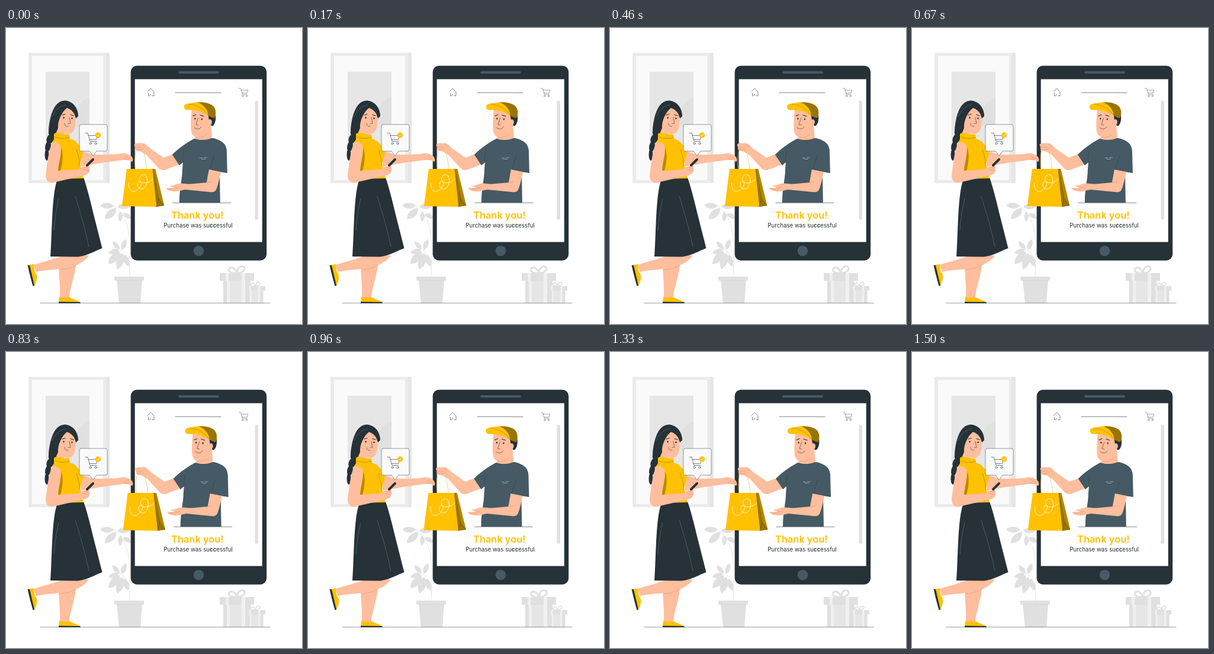
These frames come from a looping animation (500 by 500 pixels, 1540 ms). An HTML page:

```html
<!DOCTYPE html>
<html lang="en">
<head>
<meta charset="utf-8">
<title>Thank you</title>
<style>
  html, body { margin: 0; width: 100%; height: 100%; overflow: hidden; background: #fff; }
  svg { display: block; width: 100vw; height: 100vh; }
  .dark { fill: #263238; }
  .slate { fill: #455a64; }
  .gold { fill: #ffc100; }
  .shade { fill: #997400; }
  .skin { fill: #ffbe9d; }
  .g2 { fill: #e6e6e6; }
  .g3 { fill: #e0e0e0; }
  .line { fill: none; stroke: #263238; stroke-width: .6; stroke-linecap: round; stroke-linejoin: round; }
  .brow { stroke-width: 1.2; }
  .crease { fill: none; stroke: #e88f68; stroke-width: .6; stroke-linecap: round; }
  .seam { fill: none; stroke: #607580; stroke-width: .6; }
  text { font-family: Inter, sans-serif; text-anchor: middle; }
</style>
</head>
<body>
<svg viewBox="0 0 500 500">
  <defs>
    <path id="leaf" d="M0 0C4-7 12-8 19-3C14 3 6 4 0 0Z"/>
    <g id="cart" class="line">
      <path d="M0 0H4L8 14H19M5 4H21L18.500 11H7"/>
      <circle cx="8.500" cy="17.500" r="1.700"/><circle cx="17.500" cy="17.500" r="1.700"/>
    </g>
    <g id="gift">
      <path class="g3" d="M6 13H52V51H6Z"/>
      <path class="g2" d="M17 13H37V51H17Z"/>
      <path class="g3" d="M0 0H58V13H0Z"/>
      <path fill="#f0f0f0" d="M10 0H15V13H17V51H12V13H10ZM37 0H43V51H37Z"/>
      <path d="M29 0C15 1 12-7 18-9C24-11 28-4 29 0C30-8 34-13 40-11C46-7 39 0 29 0Z" fill="none" stroke="#e0e0e0" stroke-width="3"/>
    </g>
    <clipPath id="art"><path d="M67 74H141V220H67Z"/></clipPath>
  </defs>

  <!-- wall picture -->
  <path class="g2" d="M38 42H175V262H38Z"/>
  <path fill="#ebebeb" d="M38 42H169V262H38Z"/>
  <path fill="#fafafa" d="M44 47H164V257H44Z"/>
  <g clip-path="url(#art)">
    <path fill="#e6e6e6" d="M67 74H141V220H67Z"/>
    <circle class="g3" cx="151" cy="150" r="34"/>
  </g>

  <!-- plant -->
  <g class="g3">
    <path d="M209 420C207 395 212 370 207 345C204 325 195 308 180 299M209 410C207 390 203 378 190 373" fill="none" stroke="#e0e0e0" stroke-width=".8"/>
    <use href="#leaf" transform="translate(182 300) rotate(190) scale(1.200)"/>
    <use href="#leaf" transform="translate(186 304) rotate(145) scale(1.400)"/>
    <use href="#leaf" transform="translate(188 302) rotate(8) scale(1.100)"/>
    <use href="#leaf" transform="translate(193 310) rotate(100) scale(.9)"/>
    <use href="#leaf" transform="translate(197 314) rotate(35) scale(.9)"/>
    <use href="#leaf" transform="translate(192 373) rotate(235) scale(.9)"/>
    <use href="#leaf" transform="translate(196 375) rotate(-60)"/>
    <use href="#leaf" transform="translate(191 374) rotate(170)"/>
    <use href="#leaf" transform="translate(192 377) rotate(140) scale(1.500)"/>
    <use href="#leaf" transform="translate(196 380) rotate(115) scale(1.500)"/>
    <use href="#leaf" transform="translate(199 383) rotate(78) scale(1.100)"/>
  </g>
  <path class="g3" d="M187 426H230L227 465H191ZM183 420H233V426.500H183Z"/>
  <path d="M187 427H230" stroke="#d0d0d0" stroke-width=".8"/>

  <use href="#gift" x="361" y="414"/>
  <use href="#gift" transform="translate(405 436) scale(.57)"/>
  <path class="line" opacity=".8" d="M58 464.700H446"/>

  <!-- tablet -->
  <rect class="dark" x="210.700" y="63.700" width="229.500" height="329" rx="10.500"/>
  <path fill="#fff" d="M217.700 86.500H432.800V361.500H217.700Z"/>
  <rect class="slate" x="291" y="73" width="69" height="4" rx="2"/>
  <circle class="slate" cx="325.500" cy="376.500" r="8.800"/>
  <rect class="g3" x="420.500" y="123" width="5.500" height="201" rx="2.700"/>
  <path class="line" d="M286 109.200H340L363 109.500M239 107.500L244.500 102L250 108V114.500H247M240.500 110V114.500H242.500M244 112V114"/>
  <use href="#cart" transform="translate(393.500 102) scale(.73)"/>
  <text class="gold" x="323.300" y="322" font-size="16.400" font-weight="600">Thank you!</text>
  <text class="dark" x="324.600" y="337" font-size="9.700">Purchase was su<tspan font-weight="600">cc</tspan>essful</text>

  <!-- woman -->
  <path class="skin" d="M96 385C82 390 66 394 47 400L50 412C68 408 100 408 118 401C129 396 136 390 140 384Z"/>
  <path class="skin" d="M88 390L118 400C116 420 108 440 106.500 456H91C92 437 89 412 88 390Z"/>
  <path class="crease" d="M91 408C101 408 110 405 118 401"/>
  <path class="gold" d="M37.500 400.500L47 399C48 406 47 411 51 415C54 421 51 429 48 436Z"/>
  <path class="dark" d="M36.500 400.500L40 401L48 435L45.500 436C42 424 39 412 36.500 400.500Z"/>
  <path class="gold" d="M90 454C98 457 104 454 108 455C114 459 123 460 126 464H89Z"/>
  <path class="dark" d="M89 462.500L125 463L126 465H89Z"/>

  <path class="dark" d="M87 255L131 253C136 266 142 290 148 315L162.500 372C151 376 140 384 122 386.500L75 386C78 345 77 280 87 255Z"/>
  <path class="seam" d="M89 288C85 306 82 323 81 342M117 284C125 310 134 340 140 370"/>

  <g class="dark">
    <path d="M72 172C74 150 80 123 100 122.500C114 124 122 136 122 149L114 152L96 180L80 190Z"/>
    <ellipse cx="79" cy="175" rx="7" ry="9" transform="rotate(20 79 175)"/>
    <ellipse cx="75" cy="187" rx="6" ry="9" transform="rotate(25 75 187)"/>
    <ellipse cx="71" cy="200" rx="4.800" ry="9" transform="rotate(10 71 200)"/>
    <ellipse cx="69" cy="214" rx="3.500" ry="10"/>
  </g>
  <path class="skin" d="M127 206C136 213 150 214 164 214L190 213C198 210 207 212 212 217C215 220 215 225 213 226L207 223L197 223L160 228L126 234Z"/>
  <path class="crease" d="M202 217L211 221M199 220L207 223"/>
  <path class="gold" d="M81 179L107 180L108 187C119 189 126 200 130 212L125 230L131 254L87 255L88 240L77 195L81 188Z"/>
  <path class="skin" d="M79 193C72 203 70 228 67 249C67 258 72 262 80 261L132 249C141 247 143 240 140 232L128 235L122 239L88 241C89 225 96 206 91 197C88 193 84 192 79 193Z"/>
  <path class="shade" opacity=".7" d="M93 201C98 214 95 230 92 241H88C89 227 94 214 93 201Z"/>
  <path class="crease" d="M132 235L138 237M130 239L139 241"/>
  <path d="M137 232L147 222" stroke="#263238" stroke-width="4" stroke-linecap="round"/>
  <path class="line" opacity=".5" d="M119 205C122 216 125 223 124 232"/>

  <path class="skin" d="M103 135C112 138 117 145 117.500 153C118 164 116 173 111 177C107 180 101 179 98 177L97 181H83L88 169C87 157 94 142 103 135Z"/>
  <path class="gold" d="M81 179C85 175 91 178 97 179L107 180L108 187H81Z"/>
  <path class="line" opacity=".5" d="M83 184C90 187 99 187 107 185"/>
  <path class="dark" d="M103 135C112 136 117 143 118 153L122 149C121 136 114 126 103 128Z"/>
  <path class="line" d="M107 151L109 161L105 161.500M99 161C99 165 102 167 105 166"/>
  <path class="line brow" d="M95 147L100 145.500M109 146.500L114 148"/>
  <g class="dark"><ellipse cx="97.500" cy="151.500" rx="1.200" ry="1.600"/><ellipse cx="111.500" cy="152.500" rx="1.200" ry="1.600"/></g>
  <path class="seam" d="M78 150C83 138 90 132 101 130"/>

  <!-- speech bubble -->
  <path fill="#fafafa" stroke="#455a64" stroke-width=".6" d="M127 163H168Q171 163 171 166V205Q171 208 168 208H153L147 216L141 208H127Q124 208 124 205V166Q124 163 127 163Z"/>
  <use href="#cart" x="134" y="177.500"/>
  <circle class="gold" cx="155.500" cy="181" r="4.700"/>
  <path d="M153.300 181L155 182.800L158 179.500" fill="none" stroke="#fff"/>

  <!-- courier and bag -->
  <g id="courier">
    <path class="line" d="M282 295.300H380"/>
    <path class="skin" d="M285 212L266 219L243 203C239 199 236 195 231 194.500C226 195 220 193 217 196.500C216 199 219 200 218 202C218 206 221 208 225 208C230 209 232 212 237 214L257 236C261 241 267 241 273 238L294 230Z"/>
    <path class="crease" d="M218 201C222 202 226 202 230 201M219 205C224 206 228 206 232 204M231 197L236 201"/>

    <path class="slate" d="M318 187L350 186C366 190 372 196 373 207L374 245L361 243L362 295H293C293 270 298 255 298 240L299 227L293 232L281 214C292 203 303 195 318 187Z"/>
    <path class="line" opacity=".6" d="M299 227C298 219 299 213 301 208M345 239C347 229 350 222 352 216"/>
    <path d="M327 219.500H332M334 219H340M330 221.500H337" stroke="#a9b5bb" stroke-width=".8"/>
    <path class="skin" d="M343 239L363 243C361 254 358 266 356 271C354 277 350 278 344 277L303 273C296 274 290 277 283 276L277 275L272 273L271 270H284L275 266C285 267 286 263 294 262.500C301 262 306 264 312 263.500L339 261Z"/>
    <path class="crease" d="M284 270L292 270M275 272.500L286 273M339 261L347 260"/>

    <path class="skin" d="M314 136L346 144L352 153C353 160 350 163 346 164L348 185C342 190 326 190 319 187L320 184C315 182 312.500 176 312.500 169C312 159 313 148 314 136Z"/>
    <path class="crease" d="M322 184.500C328 186 335 184 340 179"/>
    <path class="dark" d="M341 144L354 146C355 154 354 161 350 165C348 166 346 165 346 162C342 157 343 150 341 144Z"/>
    <path class="skin" d="M341 158C342 153 348 153 348 159C348 163 344 166 341 164Z"/>
    <path class="gold" d="M301 134C300 129 306 127 314 127C324 124 341 125 349 131C355 137 355 146 352 152C344 150 336 144 328 141C319 138 311 139 305 138.500C302 137 301 136 301 134Z"/>
    <path class="shade" d="M324 125.500C338 125 352 128 354 139C355 144 354 150 352 152L342 148C341 138 335 130 324 125.500Z"/>
    <path class="line" opacity=".45" d="M309 129C322 129 334 136 342 148"/>
    <path class="line" d="M325 152L321 163L325 164M318 168C322 172 328 171 330 167"/>
    <path class="line brow" d="M316 148.500L321 146.500M328 147L334 149"/>
    <g class="dark"><ellipse cx="319.500" cy="153" rx="1.200" ry="1.600"/><ellipse cx="331" cy="154" rx="1.200" ry="1.600"/></g>

    <path fill="none" stroke="#f0c860" stroke-width=".8" d="M219 239C217 226 218 214 220 207M238 239C237 228 235 216 232 208"/>
    <path fill="#b38700" d="M246 238H252.500L267.500 300L254 302Z"/>
    <path class="shade" d="M247.500 238L258 288L267.500 300L254 302Z"/>
    <path class="gold" d="M204 238H247.500L254.500 302L196 301Z"/>
    <path class="line" opacity=".6" d="M249 238L258 288L254.500 302M258 288L267 300"/>
    <path d="M208 261C206 271 212 279 220 275C229 270 231 259 226 259C220 259 221 272 229 272C238 272 241 256 237 250C232 244 224 251 226 257C229 265 243 262 249 254" fill="none" stroke="#fff" stroke-width=".8"/>
  </g>
</svg>
<script>
  const courier = document.getElementById("courier");
  const LOOP = 1540, SHAKE = 1500, LEAD = 25;
  const stops = [0, -1, 2, -4, 4, -4, 4, -4, 2, -1, 0];

  function shakeAt(ms) {
    const pos = (ms % LOOP + LEAD) % SHAKE / SHAKE * (stops.length - 1);
    const i = Math.floor(pos);
    return stops[i] + (stops[i + 1] - stops[i]) * (pos - i);
  }

  function draw() {
    courier.setAttribute("transform", `translate(${shakeAt(performance.now())} 0)`);
    requestAnimationFrame(draw);
  }
  draw();
</script>
</body>
</html>
```
